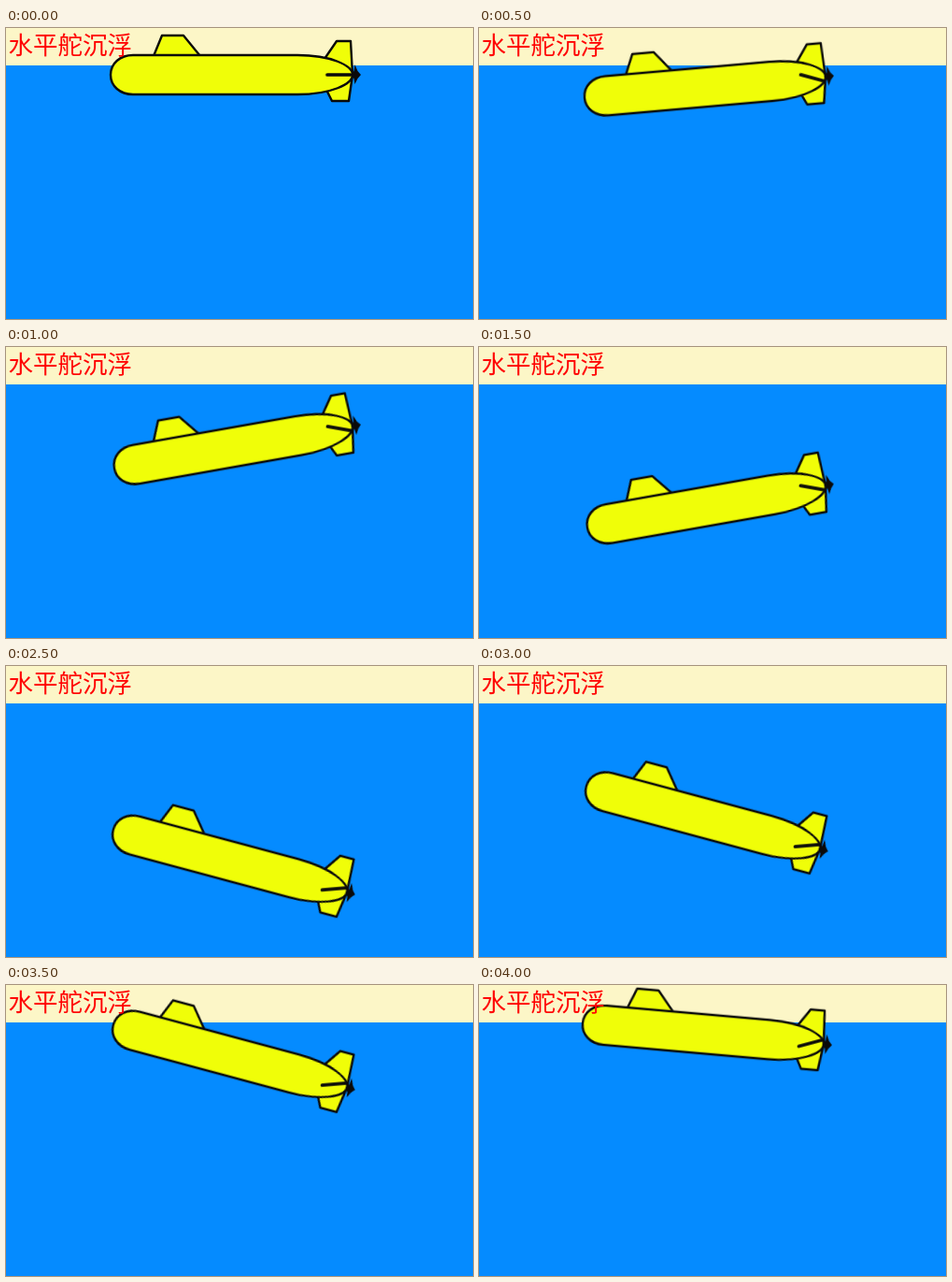
An HTML page for the animation above (4.5 s loop, 500x311 px).

```html
<!DOCTYPE html>
<html lang="zh">
<head>
<meta charset="utf-8">
<title>水平舵沉浮</title>
<style>
  html, body { margin: 0; width: 100%; height: 100%; overflow: hidden; background: #058bff; }
  svg { display: block; width: 500px; height: 311px; }
  .plate { fill: #f0fe08; stroke: #0a0a0a; stroke-width: 2.4; stroke-linejoin: round; }
  text { font: 26.5px "Noto Sans CJK SC", "Noto Sans CJK", sans-serif; fill: #f00; }
</style>
</head>
<body>
<svg viewBox="0 0 500 311">
  <rect width="500" height="311" fill="#058bff"/>
  <rect width="500" height="40" fill="#fcf6c7"/>
  <!-- The outer group turns about the stern; shapes are drawn from the nose centre. -->
  <g id="sub">
    <g transform="translate(-235)">
      <path class="plate" d="M22-20 31-42H54L72-20Z"/>
      <path class="plate" d="M205-17 218-36H233L235 0 231 28H213L206 14Z"/>
      <path class="plate" d="M0-21H176C212-21 235-10 235 0S212 21 176 21H0C-14 21-24 12-24 0S-14-21 0-21Z"/>
      <path d="M237.5-11 240.500-4 244 0 240.500 4 237.500 10 236.500 4 233.500 0 236.500-4Z" fill="#0a0a0a"/>
      <path id="plane" d="M-12.500 0H12.500" stroke="#0a0a0a" stroke-width="3.7" stroke-linecap="round"/>
    </g>
  </g>
  <text x="2.500" y="28">水平舵沉浮</text>
</svg>
<script>
  const STEP = 500, COUNT = 9, BOTTOM = 4;
  const SURFACE = 50, DEEP = 242, SHALLOW = 63.5;
  const PLANE_ANGLE = 20;

  const mix = (from, to, t) => from + (to - from) * t;
  const smooth = t => t * t * (3 - 2 * t);
  const isLevel = step => step % BOTTOM === 0 && step < 2 * BOTTOM;

  // The dive gathers speed; the ascent starts a step later and eases both ways.
  function sternDepth(step) {
    if (step <= BOTTOM) {
      const t = step / BOTTOM;
      return mix(SURFACE, DEEP, t * (1.28 * t - 0.28));
    }
    return mix(DEEP, SHALLOW, smooth((step - BOTTOM - 1) / 3));
  }

  function tilt(step) {
    if (isLevel(step)) return 0;
    return step < BOTTOM
      ? -Math.min(10, 5 * step)
      : Math.min(15, 10 * (COUNT - step) - 5);
  }

  const place = (x, y, angle) => `translate(${x}px, ${y}px) rotate(${angle}deg)`;

  function placeSub(step) {
    const angle = tilt(step);
    return place(371 - 0.4 * Math.max(0, angle), sternDepth(step), angle);
  }

  // The stern plane is always set against the hull's tilt.
  const placePlane = step => place(220.5, 0, -PLANE_ANGLE * Math.sign(tilt(step)));

  function play(id, toTransform) {
    const frames = Array.from({ length: COUNT + 1 }, (_, i) => ({
      offset: i / COUNT,
      transform: toTransform(i % COUNT),
      easing: "steps(1, end)"
    }));
    const animation = document.getElementById(id).animate(frames, {
      duration: STEP * COUNT,
      iterations: Infinity
    });
    animation.startTime = 0;
  }

  play("sub", placeSub);
  play("plane", placePlane);
</script>
</body>
</html>
```
